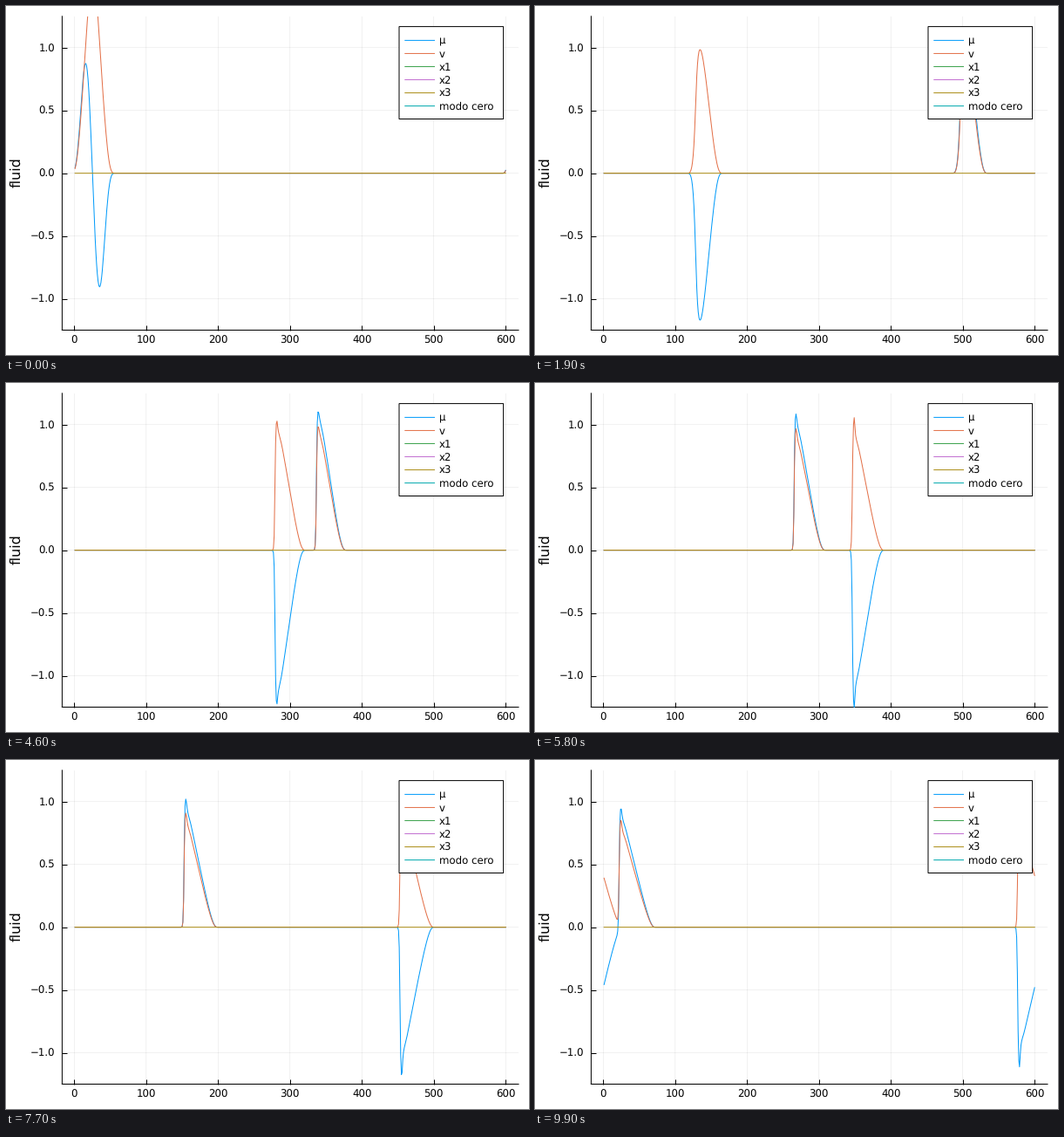
A matplotlib script for the animation above (10000 ms loop, 600 by 400 pixels).

```python
import numpy as np
import matplotlib.pyplot as plt
from matplotlib.animation import FuncAnimation
from matplotlib.patches import Rectangle

W, H, DPI = 600, 400, 100
FRAMES, INTERVAL = 100, 100
PX = 72 / DPI                    # one pixel in points
FONT = 11.8 * PX
CELLS = 600
CENTER, HALF = 26, 25            # starting pulse
SPEED = 10 / np.sqrt(3)          # cells per frame
STEEPEN = 0.345
AMP, RATIO, SKEW = 0.985, 2 / np.sqrt(3), 0.03
DIP = 0.013

BLUE, ORANGE, OLIVE = "#009afa", "#e36f47", "#ac8e18"
LEGEND = [("µ", BLUE), ("v", ORANGE), ("x1", "#3ea44e"),
          ("x2", "#c371d2"), ("x3", OLIVE), ("modo cero", "#00a9ad")]

plt.rcParams.update({"font.family": "DejaVu Sans", "path.snap": False,
                     "text.hinting": "no_hinting"})
x = np.arange(1, CELLS + 1)
z = np.linspace(-1, 1, 801)
bump = (1 - z**2) ** 4


def ramp(t, start, length):
    return np.clip((t - start) / length, 0, 1)


def gauss(d, mid, width):
    return np.exp(-((d - mid) / width) ** 2 / 2)


def pulse(center, t, tip, shift):
    """Steepening pulse: characteristics first, then a shock front."""
    d = (x - center + CELLS / 2) % CELLS - CELLS / 2
    path = HALF * z - STEEPEN * t * bump
    smooth = np.interp(d, np.maximum.accumulate(path), bump)
    mix = ramp(t, 36, 6)
    if mix == 0:
        return AMP * smooth
    crest = z >= 0
    body = np.interp(d, path[crest], bump[crest])
    front = -16.5 - 0.165 * (t - 38) + shift
    shock = body * (1 + np.tanh((d - front) / 1.05)) / 2
    shock += tip * ramp(t, 36, 20) * gauss(d, front + 2.5, 0.9)
    shock -= DIP * gauss(d, front + 6, 1.6)
    return AMP * ((1 - mix) * smooth + mix * shock)


def fields(n):
    t = n + 1
    right = pulse(CENTER + SPEED * t, t, 0.11, -0.3)
    left = pulse(CENTER - 0.5 - SPEED * t, t, 0.035, 0.6)
    mu = RATIO * (left * (1 - SKEW * left) - right * (1 + SKEW * right))
    return mu, left + right


fig = plt.figure(figsize=(W / DPI, H / DPI), dpi=DPI, facecolor="white")

# Plot area
x0, x1, y0, y1 = 64.4, 588, 371.5, 11.8
ax = fig.add_axes([x0 / W, 1 - y0 / H, (x1 - x0) / W, (y0 - y1) / H])
ax.set_xlim(-16.97, 617.97)
ax.set_ylim(-1.25, 1.25)
ax.set_xticks(range(0, 601, 100))
ax.set_yticks(np.arange(-1, 1.1, 0.5))
ax.yaxis.set_major_formatter(lambda v, _: f"{v:.1f}".replace("-", "\u2212"))
ax.tick_params(direction="in", length=6 * PX, width=PX, labelsize=FONT)
ax.tick_params(axis="x", pad=6.2 * PX)
ax.tick_params(axis="y", pad=8 * PX)
ax.grid(color="#000000", alpha=0.1, lw=0.55 * PX)
ax.set_axisbelow(True)
ax.spines[["top", "right"]].set_visible(False)
ax.spines[["left", "bottom"]].set_linewidth(PX)
fig.text(16.5 / W, 1 - 190.9 / H, "fluid", fontsize=16 * PX, rotation=90,
         rotation_mode="anchor", ha="center", va="baseline")

mu_line, = ax.plot([], [], color=BLUE, lw=PX, zorder=3)
v_line, = ax.plot([], [], color=ORANGE, lw=PX, zorder=4)
ax.plot(x, 0 * x, color=OLIVE, lw=PX, zorder=5)

# Legend, in pixel coordinates
key = fig.add_axes([0, 0, 1, 1])
key.set_xlim(0, W)
key.set_ylim(H, 0)
key.axis("off")
key.add_patch(Rectangle((451, 23.6), 119.6, 105.9, fc="white", ec="black", lw=PX))
for i, (name, color) in enumerate(LEGEND):
    y = 39.4 + 15.04 * i
    key.plot([457.3, 492], [y, y], color=color, lw=PX, solid_capstyle="butt")
    key.text(497, y + 4.1, name, fontsize=FONT, va="baseline")


def draw(n):
    mu, v = fields(n)
    mu_line.set_data(x, mu)
    v_line.set_data(x, v)
    return mu_line, v_line


anim = FuncAnimation(fig, draw, frames=FRAMES, interval=INTERVAL,
                     repeat=True, repeat_delay=0)
plt.show()
```
